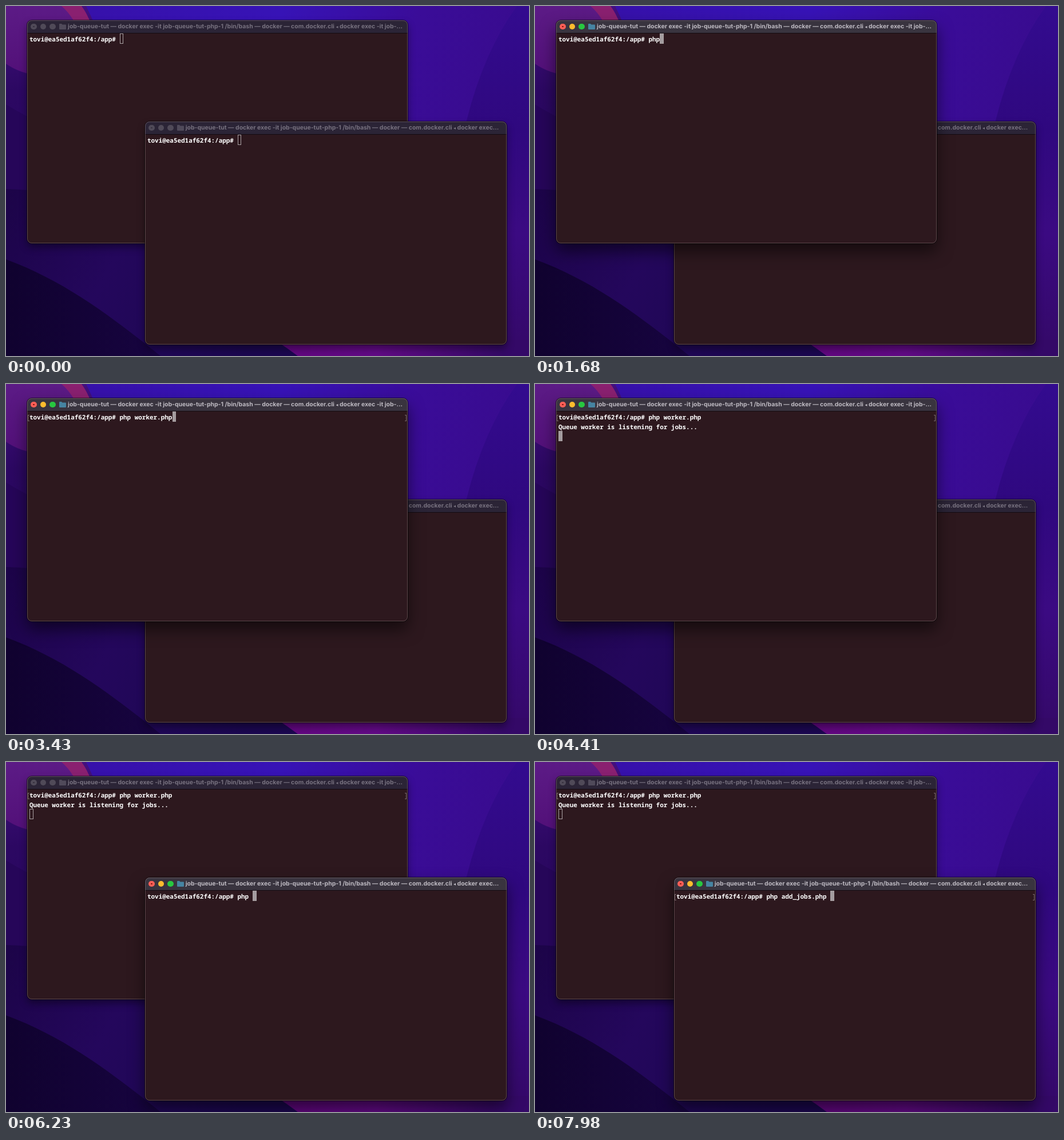
Write an HTML page that moves like this. It is 914 by 612 pixels and loops after 8 s.

```html
<!DOCTYPE html>
<html lang="en">
<head>
<meta charset="utf-8">
<title>Job queue terminals</title>
<style>
  html, body { margin: 0; width: 100%; height: 100%; overflow: hidden; background: #230660; }
  #stage { position: relative; width: 914px; height: 612px; overflow: hidden; text-rendering: geometricPrecision; }
  #stage > svg { position: absolute; inset: 0; }
  .win {
    position: absolute; height: 389.5px; border-radius: 8px; background: #2d181e;
    box-shadow: 0 0 0 1px rgba(0,0,0,.55), 0 7px 14px rgba(0,0,0,.42);
  }
  .win::after {
    content: ""; position: absolute; inset: 0; border-radius: 8px;
    border: 1px solid rgba(190,165,165,.34);
  }
  .win.active { z-index: 2; box-shadow: 0 0 0 1px rgba(0,0,0,.6), 0 14px 28px rgba(0,0,0,.55); }
  .win > * { position: absolute; }
  .bar {
    left: 0; right: 0; top: 0; height: 22px; border-radius: 8px 8px 0 0;
    background: #2b2436; border-bottom: 1px solid #130b11;
  }
  .active .bar { background: #39343f; }
  .dot { top: 5.8px; width: 10.4px; height: 10.4px; border-radius: 50%; background: #504a58; }
  .active .dot { background: var(--c); }
  .unsaved { left: 10.1px; top: 9.6px; width: 2.8px; height: 2.8px; border-radius: 50%; background: #352f3c; }
  .active .unsaved { background: #7d120d; }
  .folder { left: 56px; top: 6px; fill: #504a5a; }
  .active .folder { fill: #4684a2; }
  .title {
    top: 0; height: 22px; line-height: 22px; transform: translateX(-50%); white-space: nowrap;
    font: 700 10.47px/22px Inter, "DejaVu Sans", sans-serif; color: #77717f;
  }
  .title small { font-size: 8px; }
  .active .title { color: #bdb9c1; }
  pre {
    left: 4px; top: 25px; margin: 0; color: #fff;
    font: 700 10.95px/17px "Noto Sans Mono", monospace;
  }
  .cursor { box-sizing: border-box; width: 6.6px; height: 18px; border: 1px solid #aaa1a4; }
  .active .cursor { background: #a39c9f; }
  .mark { top: 29px; width: 2px; height: 9px; border: 1px solid #78686c; }
  .mark.l { left: 1px; border-right: 0; }
  .mark.r { right: 2px; border-left: 0; }
</style>
</head>
<body>
<div id="stage">
  <svg width="914" height="612" viewBox="0 0 914 612">
    <defs>
      <linearGradient id="sky" x2="1" y2=".25">
        <stop offset="0" stop-color="#3610a6"/><stop offset=".5" stop-color="#3713b6"/>
        <stop offset=".75" stop-color="#3a0c98"/><stop offset="1" stop-color="#380b8c"/>
      </linearGradient>
      <linearGradient id="right" x2="0" y2="1">
        <stop offset="0" stop-color="#330b8f"/><stop offset=".35" stop-color="#2f087f"/>
        <stop offset=".65" stop-color="#3b0a82"/><stop offset="1" stop-color="#340967"/>
      </linearGradient>
      <linearGradient id="left" x2="0" y2="1">
        <stop offset="0" stop-color="#43107e"/><stop offset=".35" stop-color="#2c0862"/>
        <stop offset="1" stop-color="#250660"/>
      </linearGradient>
      <linearGradient id="low" x2="1" y2=".3">
        <stop offset="0" stop-color="#1c0448"/><stop offset=".45" stop-color="#24075c"/>
        <stop offset="1" stop-color="#1b0750"/>
      </linearGradient>
      <linearGradient id="deep" x2="1">
        <stop offset="0" stop-color="#10022f"/><stop offset="1" stop-color="#170440"/>
      </linearGradient>
      <linearGradient id="magenta" x2="1">
        <stop offset="0" stop-color="#62067f"/><stop offset=".4" stop-color="#620a86"/>
        <stop offset=".9" stop-color="#340967"/>
      </linearGradient>
      <linearGradient id="plum" x2="0" y2="1">
        <stop offset="0" stop-color="#5c1b86"/><stop offset="1" stop-color="#521078"/>
      </linearGradient>
    </defs>
    <path fill="url(#sky)" d="M0 0H914V612H0z"/>
    <path fill="url(#right)" d="M893 0Q835 80 805 200Q780 400 780 612H914V0z"/>
    <path fill="url(#left)" d="M0 0H140Q170 60 180 120V420H0z"/>
    <path fill="#8a2070" d="M90 0H132Q141 12 149 32H90z"/>
    <path fill="url(#plum)" d="M0 0H97Q120 20 128 50L60 122Q24 118 0 101z"/>
    <path fill="#260659" d="M0 172Q22 186 60 205V340H0z"/>
    <path fill="url(#low)" d="M0 320Q40 321 80 326L520 420V612H0z"/>
    <path fill="url(#deep)" d="M0 443C95 478 175 535 270 612H0z"/>
    <path fill="url(#magenta)" d="M470 584Q490 597 510 612H914V584z"/>
  </svg>
</div>
<script>
  const LOOP = 8000, CHAR = 6.57, LINE = 17;
  const PROMPT = "tovi@ea5ed1af62f4:/app# ";
  const TITLE = "job-queue-tut — docker exec -it job-queue-tut-php-1 /bin/bash — docker — com.docker.cli <small>◂</small> docker exec";
  const stage = document.getElementById("stage");

  function makeWindow(left, top, width, titleX, title) {
    const el = document.createElement("div");
    el.className = "win";
    el.style.cssText = `left:${left}px;top:${top}px;width:${width}px`;
    const dots = ["#fe5f57", "#febc2e", "#28c840"]
      .map((c, i) => `<i class="dot" style="--c:${c};left:${6.3 + i * 16.5}px"></i>`).join("");
    el.innerHTML = `<div class="bar"></div>${dots}<i class="unsaved"></i>
      <svg class="folder" width="12" height="10"><path d="M0 1Q0 0 1 0H4L5.5 1.5H11Q12 1.5 12 2.5V9Q12 10 11 10H1Q0 10 0 9z"/></svg>
      <div class="title" style="left:${titleX}px">${title}</div>
      <pre></pre><i class="cursor"></i><i class="mark l"></i><i class="mark r"></i>`;
    stage.append(el);
    return el;
  }

  const worker = {
    el: makeWindow(37, 25, 665, 363.5, TITLE + " -it job-…"),
    command: "php worker.php",
    keys: [1470, 1610, 1680, 1820, 2030, 2170, 2240, 2240, 2380, 2520, 2590, 2870, 2940, 3080],
    enter: 3430, newline: 3500, reply: 3640, output: "Queue worker is listening for jobs..."
  };
  const sender = {
    el: makeWindow(243, 202, 632, 344.5, TITLE + "…"),
    command: "php add_jobs.php ",
    // the file name is completed in one go after "add_job"
    keys: [5600, 5740, 5880, 6230, 6580, 6720, 6860, 7280, 7490, 7560, 7630, ...Array(6).fill(7770)],
    enter: 7980, newline: Infinity, reply: Infinity, output: ""
  };

  function draw(win, t, active) {
    const count = win.keys.filter(k => k <= t).length;
    const row = (t >= win.newline) + (t >= win.reply);
    const col = row ? 0 : PROMPT.length + count;
    const find = s => win.el.querySelector(s);
    win.el.classList.toggle("active", active);
    find("pre").textContent = PROMPT + win.command.slice(0, count) + (t >= win.reply ? "\n" + win.output : "");
    const cursor = find(".cursor").style;
    cursor.left = 4 + col * CHAR + "px";
    cursor.top = 23 + row * LINE + "px";
    for (const mark of win.el.querySelectorAll(".mark"))
      mark.style.visibility = t >= win.enter ? "visible" : "hidden";
  }

  function frame() {
    const t = performance.now() % LOOP;
    draw(worker, t, t >= 700 && t < 5040);
    draw(sender, t, t >= 5040);
    requestAnimationFrame(frame);
  }
  frame();
</script>
</body>
</html>
```
